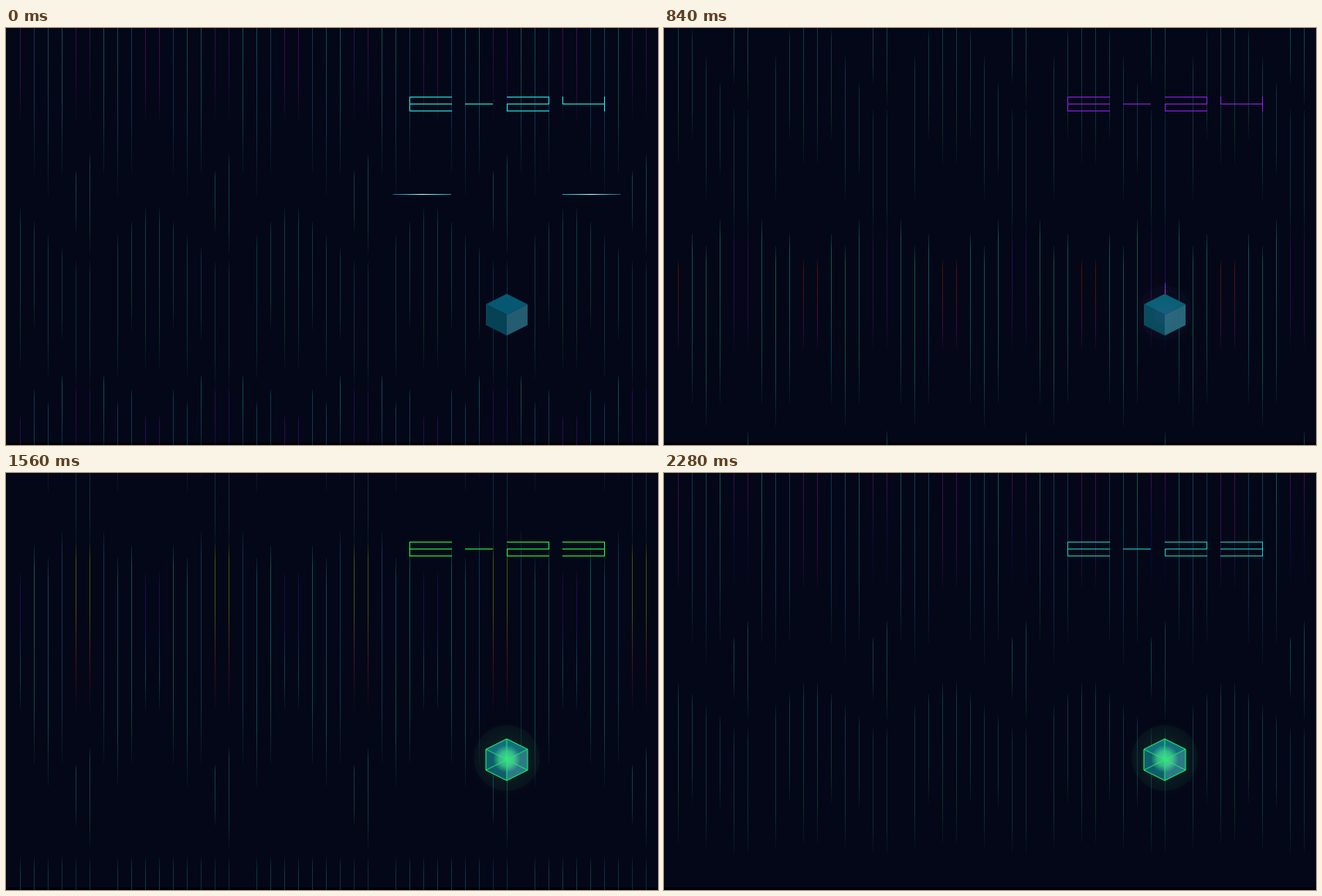
These frames come from a looping animation (750 px wide and 480 px high, 2400 ms). An HTML page with a canvas:

```html
<!DOCTYPE html>
<html lang="en">
<head>
<meta charset="utf-8">
<title>Energy cube</title>
<style>
html, body { margin: 0; width: 100%; height: 100%; overflow: hidden; background: #040717; }
canvas { display: block; width: 750px; height: 480px; }
</style>
</head>
<body>
<canvas id="stage" width="750" height="480"></canvas>
<script>
const ctx = document.getElementById('stage').getContext('2d');
const LOOP = 2.4, STEP = 0.12;
const CX = 576, CY = 330, BEAM_Y = 192, TO_CUBE = 114;

const ramp = (t, a, b) => Math.min(1, Math.max(0, (t - a) / (b - a)));
const smooth = x => x * x * (3 - 2 * x);
const mix = (a, b, p) => a + (b - a) * p;

// Columns mirror within each group of ten: rank 0 outside, rank 4 inside.
const rankOf = c => Math.min((c + 9) % 10, (10 - c % 10) % 10);

function streak(x, top, bottom, hues, alpha) {
  if (top > 480 || bottom < 0) return;
  const ink = (h, a) => `hsla(${h}, 78%, 21%, ${a * alpha})`;
  const g = ctx.createLinearGradient(0, top, 0, bottom);
  g.addColorStop(0, ink(hues[0], 0.3));
  g.addColorStop(0.1, ink(hues[0], 1));
  g.addColorStop(0.4, ink(hues[0], 1));
  g.addColorStop(0.75, ink(hues[1], 0.85));
  g.addColorStop(1, ink(hues[1], 0.15));
  ctx.fillStyle = g;
  ctx.fillRect(x, top, 1, bottom - top);
}

const cycleHue = t => 265 + 380 * smooth(ramp(t, 0.36, 1.8));

function trailHue(k, t) {
  if (k === 0) return cycleHue(t);
  if (k === 4) return cycleHue(t - 0.54);
  return 185 + 20 * Math.sin(3 * t + k);
}

// Long streaks that stretch while they climb.
function drawLong(x, k, t) {
  const top = 446 - 8 * k - 22 * (k % 2) - 213 * t;
  const bottom = 432 + 88 * Math.sin(Math.PI * k / 4) - 40 * t - 40 * t * t;
  const hues = [trailHue(k, t), trailHue(k, t - 0.25)];
  streak(x, top, Math.max(bottom, top + 75), hues, 0.78);
}

// Short streaks of fixed length; outer columns move faster.
function drawShort(x, k, t) {
  const top = 443 - (280 - 18 * k) * (t - 1.56);
  const len = 185 - 10 * k - 50 * (k % 2);
  streak(x, top, top + len, [178 + 5 * k, 155 + 8 * k], 0.55);
}

function drawExtra(x, c, t) {
  const top = (c % 10 === 5 ? 434 : 415) - 204 * (t - 1.08);
  streak(x, top, top + (c % 10 === 5 ? 70 : 115), [180, 160], 0.6);
}

function drawRain(t) {
  for (let c = 1; c <= 46; c++) {
    const k = rankOf(c), x = c * 16;
    for (const u of [t - LOOP, t, t + LOOP]) {
      if (u >= -STEP) drawLong(x, k, u);
      if (u > 1 && c % 10 !== 7) drawShort(x, k, u);
      if (u > 0.8 && k === 4) drawExtra(x, c, u);
    }
  }
}

const HUES = [[0, 184], [0.36, 135], [0.6, 220], [1.08, 320], [1.56, 495], [1.8, 528], [2.4, 546]];

function signalHue(t) {
  const i = HUES.findIndex(([at]) => at > t);
  const [a, ha] = HUES[i - 1], [b, hb] = HUES[i];
  return mix(ha, hb, ramp(t, a, b));
}

// Segments: top, middle, bottom, upper left, lower left, upper right, lower right.
const GLYPHS = { E: 'tmbpq', '-': 'm', 2: 'tmbqr', 3: 'tmbrs', 4: 'mprs' };

function drawGlyph(ch, x) {
  const w = ch === '-' ? 32 : 49, r = x + 48;
  const seg = {
    t: [x, 79, w, 1], m: [x, 87, w, 1], b: [x, 95, w, 1],
    p: [x, 79, 1, 9], q: [x, 87, 1, 9], r: [r, 79, 1, 9], s: [r, 87, 1, 9]
  };
  for (const k of GLYPHS[ch]) ctx.fillRect(...seg[k]);
}

function drawReadout(t) {
  ctx.fillStyle = `hsl(${signalHue(t)}, 85%, ${mix(52, 42, ramp(t, 1.5, 2.28))}%)`;
  const text = t < 1.2 ? 'E-24' : 'E-23';
  [464, 528, 576, 640].forEach((x, i) => drawGlyph(text[i], x));
}

// Two pulses meet at the centre, then fall into the cube.
function drawBeam(t) {
  const head = 277 * t - 64, tail = head - 67;
  if (tail > TO_CUBE) return;
  const hue = signalHue(t), p = ramp(t, 0, 0.36);
  if (tail < 0) {
    const near = Math.max(0, -head), y = Math.round(BEAM_Y - 1 + p);
    for (const dir of [-1, 1]) {
      const a = CX - dir * tail, b = CX + dir * near;
      const g = ctx.createLinearGradient(a, 0, b, 0);
      g.addColorStop(0, `hsla(${hue + 15}, 85%, 48%, ${mix(0.5, 1, p)})`);
      g.addColorStop(0.5, `hsl(${hue + 8}, 85%, ${mix(82, 50, p)}%)`);
      g.addColorStop(1, `hsla(${hue}, 85%, 50%, ${mix(0.6, 1, p)})`);
      ctx.fillStyle = g;
      ctx.fillRect(Math.min(a, b), y, -tail - near, 1);
    }
  }
  if (head > 0) {
    const y = BEAM_Y + Math.max(0, tail), end = BEAM_Y + Math.min(head, TO_CUBE);
    const spread = 45 * ramp(t, 0.36, 0.6);
    const g = ctx.createLinearGradient(0, y, 0, end);
    g.addColorStop(0, `hsl(${hue - spread}, 90%, 50%)`);
    g.addColorStop(1, `hsl(${hue + spread}, 90%, 48%)`);
    ctx.fillStyle = g;
    ctx.fillRect(CX, y, 1, end - y);
  }
}

const HEX = [[0, 24], [24, 12], [24, -12], [0, -24], [-24, -12], [-24, 12]];

function path(points) {
  ctx.beginPath();
  points.forEach(([x, y]) => ctx.lineTo(CX + x, CY + y));
  ctx.closePath();
}

function face(points, low, high, p) {
  path(points);
  ctx.fillStyle = `rgb(${low.map((v, i) => Math.round(mix(v, high[i], p)))})`;
  ctx.fill();
}

function glow(radius, rgb, alpha) {
  const g = ctx.createRadialGradient(CX, CY - 1, 0, CX, CY - 1, radius);
  g.addColorStop(0, `rgba(${rgb}, ${alpha})`);
  g.addColorStop(0.55, `rgba(${rgb}, ${alpha * 0.7})`);
  g.addColorStop(1, `rgba(${rgb}, 0)`);
  ctx.fillStyle = g;
  ctx.beginPath();
  ctx.arc(CX, CY - 1, radius, 0, 7);
  ctx.fill();
}

function drawCube(t) {
  const charge = ramp(t, 0.48, 1.5), lit = ramp(t, 1.02, 1.38), o = [0, 0];
  const tint = lit > 0.3 ? '80, 245, 150' : '120, 90, 200';
  if (charge) {
    ctx.fillStyle = `rgba(${tint}, ${mix(0.02, 0.035, charge)})`;
    ctx.beginPath();
    ctx.arc(CX, CY - 2, 28 + 10 * charge, 0, 7);
    ctx.fill();
    glow(42, tint, 0.07 * charge);
  }
  face([HEX[3], HEX[2], o, HEX[4]], [6, 88, 114], [18, 112, 126], charge);
  face([HEX[4], o, HEX[0], HEX[5]], [6, 66, 86], [14, 94, 108], charge);
  face([HEX[2], HEX[1], HEX[0], o], [36, 92, 114], [44, 122, 134], charge);
  if (charge) glow(16, tint, 0.8 * charge * charge);
  if (!lit) return;
  ctx.strokeStyle = lit < 0.3 ? '#30c8d8' : '#20f568';
  ctx.lineWidth = 1;
  ctx.setLineDash([160 * lit, 200]);
  path(HEX);
  ctx.stroke();
  ctx.setLineDash([]);
  ctx.globalAlpha = 0.85 * ramp(lit, 0.3, 1);
  ctx.beginPath();
  for (const [x, y] of HEX) {
    ctx.moveTo(CX + x, CY + y);
    ctx.lineTo(CX, CY);
  }
  ctx.stroke();
  ctx.globalAlpha = 1;
}

function draw(t) {
  ctx.fillStyle = '#040717';
  ctx.fillRect(0, 0, 750, 480);
  ctx.fillStyle = '#010108';
  ctx.fillRect(0, 477, 750, 3);
  drawRain(t);
  drawReadout(t);
  drawBeam(t);
  drawCube(t);
}

const start = performance.now();
function tick() {
  const t = ((performance.now() - start) / 1000) % LOOP;
  draw(Math.floor(t / STEP) * STEP);
  requestAnimationFrame(tick);
}
tick();
</script>
</body>
</html>
```
